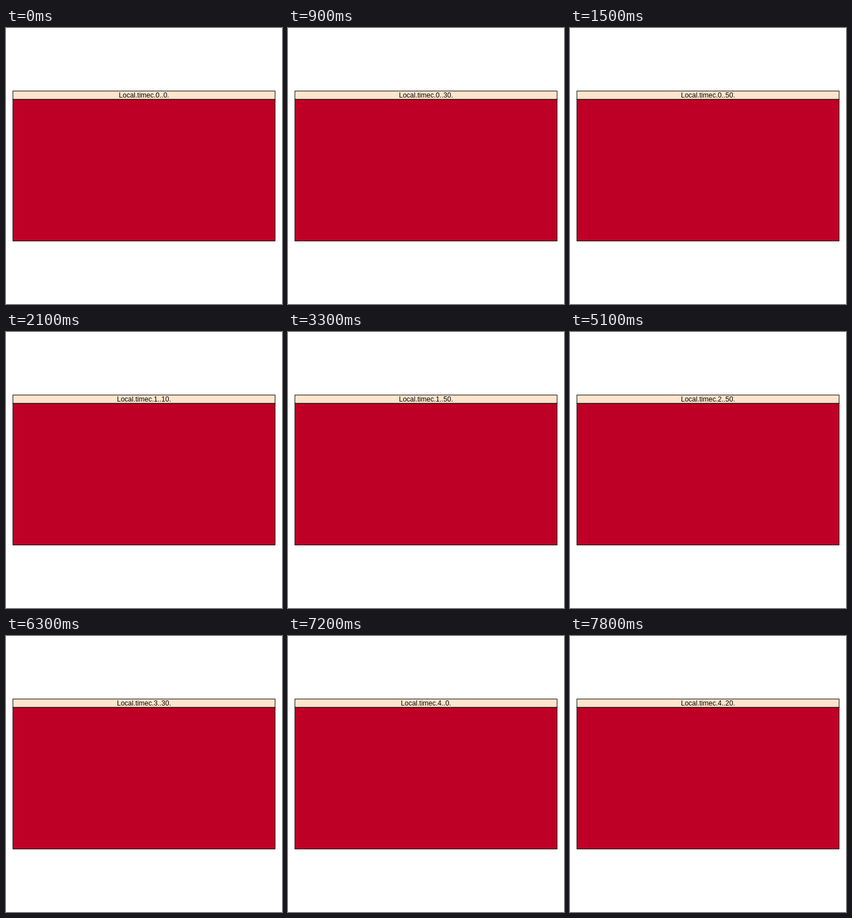
An HTML page for the animation above (8000 ms loop, 480 by 480 pixels).

```html
<!DOCTYPE html>
<html lang="en">
<head>
<meta charset="utf-8">
<title>Local time</title>
<style>
  html, body { margin: 0; width: 100%; height: 100%; overflow: hidden; background: #fff; }
  svg { display: block; width: 100%; height: 100%; }
  rect { stroke: #000; stroke-width: 1; }
  text { font: 12px "Liberation Sans", Arial, sans-serif; text-anchor: middle; fill: #000; }
</style>
</head>
<body>
<svg viewBox="0 0 480 480">
  <rect x="12" y="124" width="456" height="246.4" fill="#bf0026"/>
  <rect x="12" y="109.6" width="456" height="14.4" fill="#ffe5cc"/>
  <text id="label" x="240" y="121">Local.timec.0..0.</text>
</svg>
<script>
  const LOOP = 8000, STEP = 300, MINUTES = 10;
  const label = document.getElementById('label');
  const start = performance.now();

  function draw(now) {
    const t = Math.max(0, now - start) % LOOP;
    const total = Math.floor(t / STEP) * MINUTES;
    const text = `Local.timec.${Math.floor(total / 60)}..${total % 60}.`;
    if (label.textContent !== text) label.textContent = text;
    requestAnimationFrame(draw);
  }
  draw(start);
</script>
</body>
</html>
```
